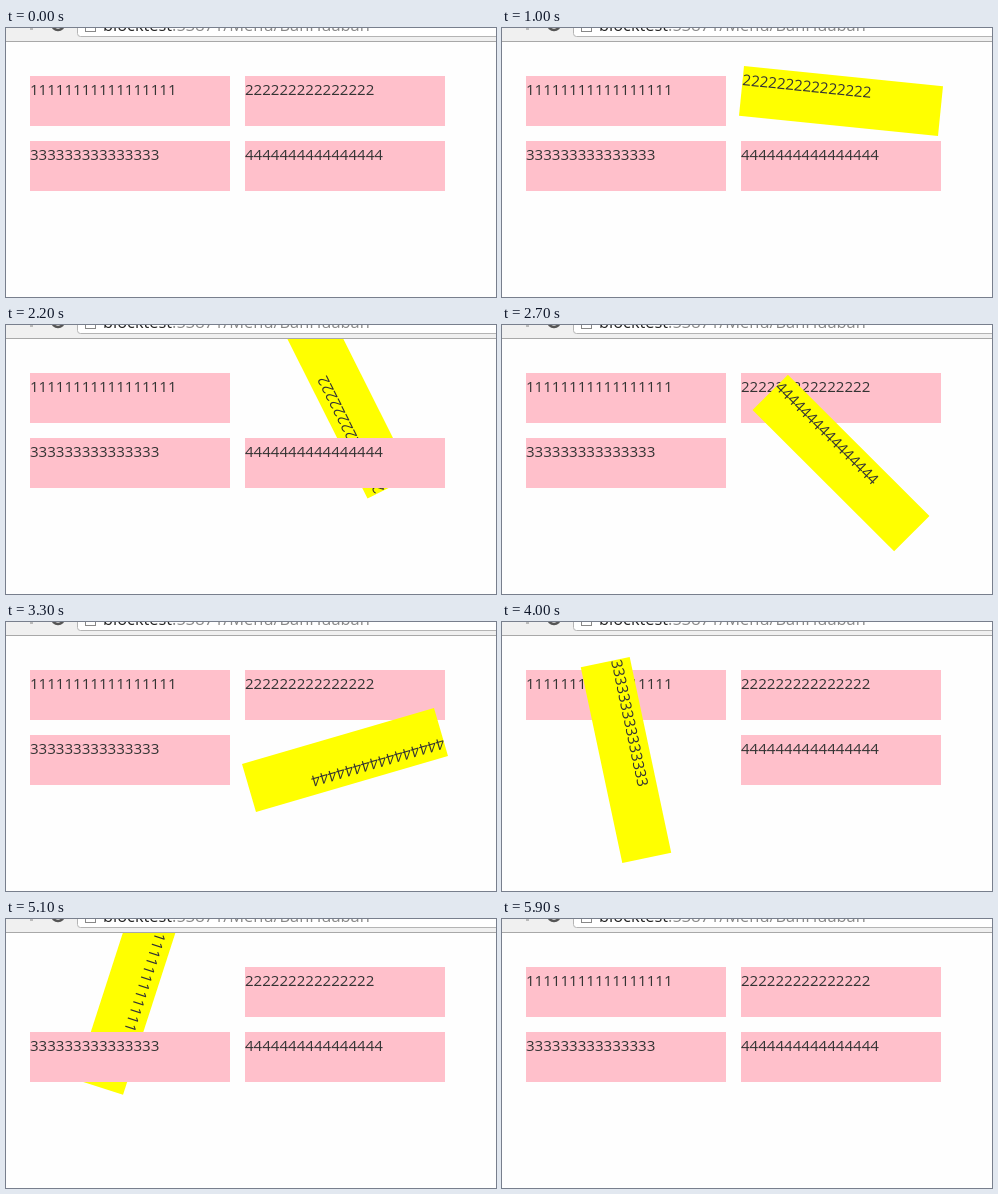
Recreate the animation shown at these times as an HTML page with a canvas. Size 490 px wide and 269 px high, loop 7100 ms.

```html
<!DOCTYPE html>
<html lang="en">
<head>
<meta charset="utf-8">
<title>Spinning boxes</title>
<style>
  html, body { margin: 0; width: 100%; height: 100%; overflow: hidden; background: #fefefe; }
  canvas { display: block; }
</style>
</head>
<body>
<canvas id="stage" width="490" height="269"></canvas>
<script>
const ctx = document.getElementById('stage').getContext('2d');
const LOOP = 7100, STEP = 100;
const DEG_PER_MS = 0.198;
const W = 200, H = 50, BAR = 14;

// Painted in this order, so later boxes cover earlier ones.
const boxes = [
  { x: 24, y: 48, text: '1'.repeat(17) },
  { x: 239, y: 48, text: '2'.repeat(15) },
  { x: 24, y: 113, text: '3'.repeat(15) },
  { x: 239, y: 113, text: '4'.repeat(16) },
];

// While hovered a box turns at constant speed; it snaps back on leaving.
const hovers = [
  { box: 1, from: 496, to: 690 },
  { box: 1, from: 971, to: 2473 },
  { box: 3, from: 2473, to: 3490 },
  { box: 2, from: 3606, to: 4555 },
  { box: 0, from: 4555, to: 5280 },
  { box: 2, from: 5280, to: 5890 },
];

function drawBox({ x, y, text }, hover, t) {
  ctx.save();
  ctx.translate(x + W / 2, y + H / 2);
  if (hover) ctx.rotate((t - hover.from) * DEG_PER_MS * Math.PI / 180);
  ctx.fillStyle = hover ? '#ff0' : '#ffc0cb';
  ctx.fillRect(-W / 2, -H / 2, W, H);
  ctx.fillStyle = '#333';
  ctx.font = '15.08px "Open Sans", "Noto Sans", sans-serif';
  ctx.fillText(text, -W / 2, -H / 2 + 19);
  ctx.restore();
}

function drawToolbar() {
  ctx.fillStyle = '#f0f0f0';
  ctx.fillRect(0, 0, 490, BAR);
  ctx.fillStyle = '#a8a8a8';
  ctx.fillRect(0, BAR - 1, 490, 1);

  // address field
  ctx.beginPath();
  ctx.roundRect(71.5, -20.5, 440, 29, 3);
  ctx.fillStyle = '#fff';
  ctx.fill();
  ctx.strokeStyle = '#b4b4b4';
  ctx.lineWidth = 1;
  ctx.stroke();

  // page icon and lower ends of the buttons
  ctx.strokeStyle = '#888';
  ctx.strokeRect(79.5, -9.5, 10, 13);
  ctx.fillStyle = '#bbb';
  ctx.fillRect(24, 0, 3, 2);
  ctx.strokeStyle = '#555';
  ctx.lineWidth = 2.5;
  ctx.beginPath();
  ctx.arc(52, -4, 6, 0, Math.PI);
  ctx.stroke();

  ctx.font = '16.4px "Open Sans", "Noto Sans", sans-serif';
  const host = 'blocktest';
  ctx.fillStyle = '#222';
  ctx.fillText(host, 97, 3);
  ctx.fillStyle = '#888';
  ctx.fillText(':53871/Menu/BanHuaban', 97 + ctx.measureText(host).width, 3);
}

function draw(now) {
  const t = Math.floor(now % LOOP / STEP) * STEP;
  const hover = hovers.find(h => t >= h.from && t < h.to);
  ctx.fillStyle = '#fefefe';
  ctx.fillRect(0, 0, 490, 269);
  boxes.forEach((box, i) => drawBox(box, hover && hover.box === i ? hover : null, t));
  drawToolbar();
}

const start = performance.now();
(function tick() {
  draw(performance.now() - start);
  requestAnimationFrame(tick);
})();
</script>
</body>
</html>
```
